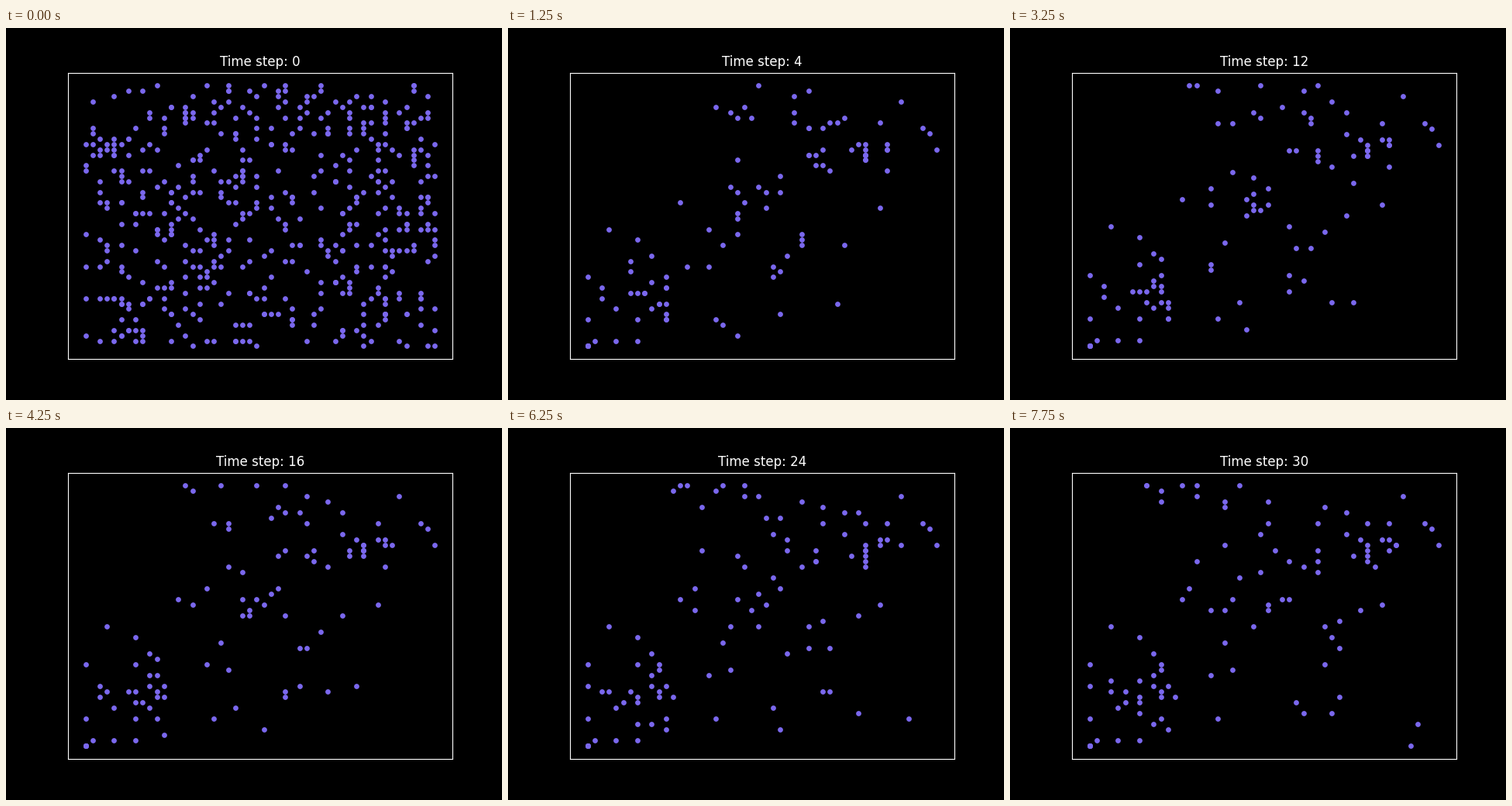
Write a matplotlib script that moves like this. It is 640 by 480 pixels and loops after 8000 ms.

```python
import matplotlib.pyplot as plt
import numpy as np
from matplotlib.animation import FuncAnimation

GRID = 50
LAST_STEP = 30
INTERVAL = 250
PEAKS = np.array([(11, 11), (37, 38)])

# Cells around the edge of the two hills that stay taken throughout.
OUTPOSTS = np.array([
    (0, 0), (1, 1), (4, 1), (7, 1), (0, 5), (18, 5), (7, 20), (3, 22),
    (13, 27), (25, 26), (41, 26), (44, 46), (47, 41), (48, 40), (49, 37),
])

rng = np.random.default_rng(7)


def walks(start, pace, drift=(0, 0), spread=2):
    """Positions at every step; a hop runs along one axis only.

    pace is the chance of a hop in a step, drift the mean hop per axis.
    """
    shape = (LAST_STEP, len(start))
    hops = rng.normal(drift, spread, shape + (2,))
    along = np.eye(2)[rng.integers(0, 2, shape)]
    moves = hops * along * (rng.random(shape) < pace)[..., None]
    return np.concatenate([[start], start + moves.cumsum(axis=0)])


def hill(peak, width, count):
    return rng.normal(peak, width, (count, 2))


def field(low, high, count):
    return rng.uniform(low, high, (count, 2))


crowd = rng.integers(0, GRID, (500, 2))

# Settlers hold the hills; the others drift away from the ridge between them.
survivors = np.concatenate([
    walks(hill(PEAKS[0], 4.5, 26), pace=0.06),
    walks(hill(PEAKS[1], 3.5, 22), pace=0.06),
    walks(field((20, 28), (34, 48), 20), pace=0.5, drift=(-1.3, 0.4)),
    walks(field((14, 2), (30, 18), 10), pace=0.5, drift=(1.2, -0.2)),
    walks(field((20, 18), (32, 32), 9), pace=0.2),
], axis=1)


def starving(step):
    """The part of the crowd still alive, heading for the nearest peak."""
    alive = crowd[:int(len(crowd) * 0.4 ** step)]
    gaps = PEAKS - alive[:, None]
    nearest = np.abs(gaps).sum(axis=2).argmin(axis=1)
    return alive + 0.15 * step * gaps[np.arange(len(alive)), nearest]


def top_row(step):
    return GRID - 1 if step < 6 else GRID - 2


def agents(step):
    if step == 0:
        return crowd
    corner_pile = np.zeros((4, 2))
    groups = [OUTPOSTS, corner_pile, survivors[step]]
    if step < 4:
        groups.append(starving(step))
    cells = np.rint(np.concatenate(groups))
    return np.clip(cells, 0, (GRID - 1, top_row(step)))


plt.style.use("dark_background")
fig, ax = plt.subplots(figsize=(6.4, 4.8), dpi=100)
ax.set(xticks=[], yticks=[], xlim=(-0.05 * (GRID - 1), 1.05 * (GRID - 1)))
dots = ax.scatter([], [], s=15, color="mediumslateblue")
title = ax.set_title("")


def draw(frame):
    step = max(0, frame - 1)
    top = top_row(step)
    dots.set_offsets(agents(step))
    ax.set_ylim(-0.05 * top, 1.05 * top)
    title.set_text(f"Time step: {step}")
    return dots, title


animation = FuncAnimation(fig, draw, frames=LAST_STEP + 2, interval=INTERVAL,
                          repeat=True, repeat_delay=0)
plt.show()
```
